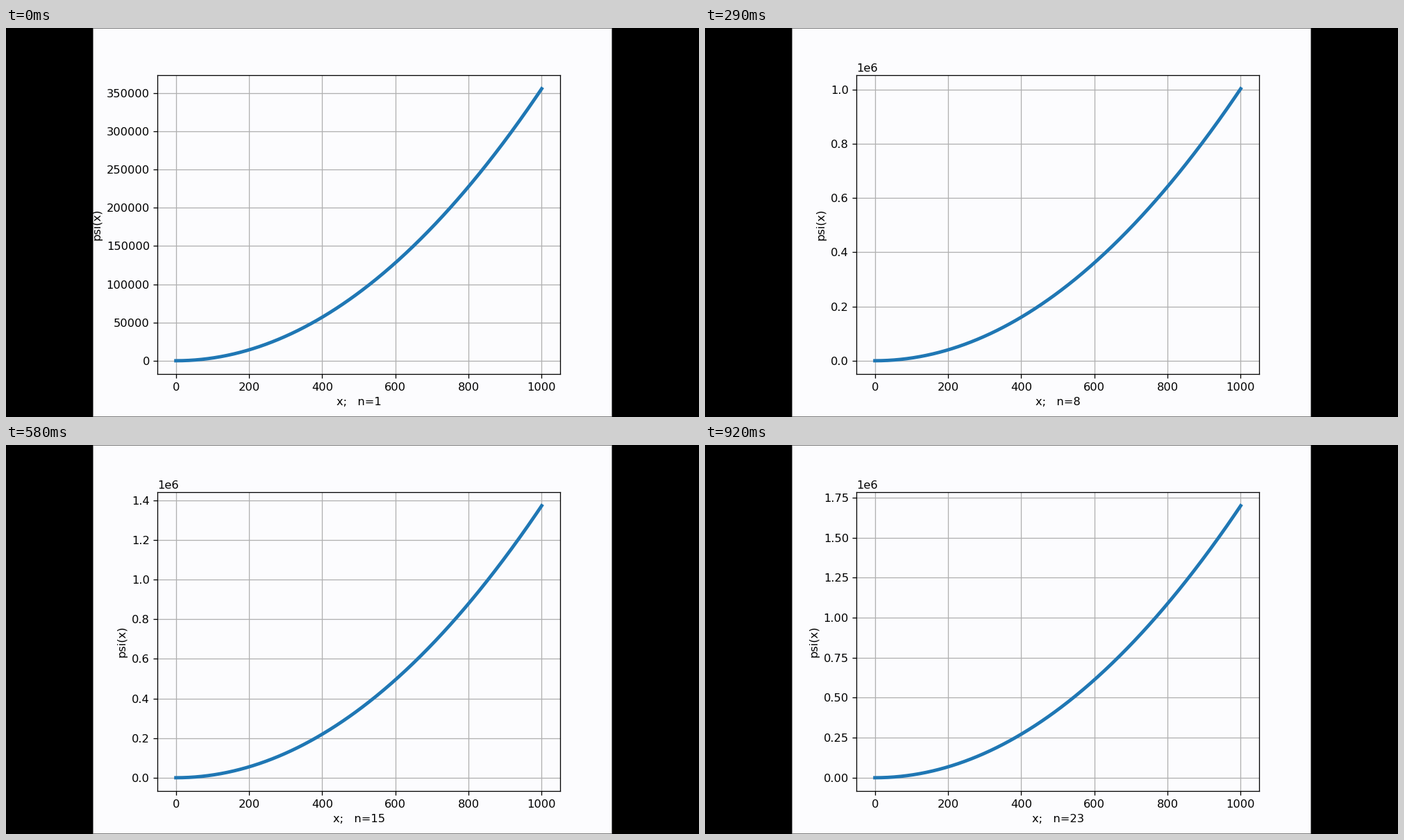
Animation, 998 px wide and 561 px high, one loop 970 ms. Source, as a matplotlib script:

```python
import math

import matplotlib.pyplot as plt
import numpy as np
from matplotlib.animation import FuncAnimation
from matplotlib.patches import Rectangle

W, H = 998, 561
DPI = 116.875
LEFT, RIGHT = 125, 873        # paper edges in pixels
EDGE = 0.5                    # soft outline of the paper
AX_LEFT, AX_RIGHT = 218.3, 797.8
AX_TOP, AX_BOTTOM = 67.95, 499.46
TICK_MS, LOOP_MS = 10, 970
FPS, N_MAX = 24, 23
PAPER = "#fcfcfe"

plt.rcParams["font.family"] = "DejaVu Sans"

# The small excess keeps the pixel size from truncating downwards.
fig = plt.figure(figsize=((W + 1e-4) / DPI, (H + 1e-4) / DPI),
                 dpi=DPI, facecolor=PAPER)


def pixel_box(left, top, right, bottom):
    """Figure fractions of a box given in pixels from the top left."""
    return left / W, 1 - bottom / H, (right - left) / W, (bottom - top) / H


def black_bar(left, top, right, bottom):
    x0, y0, width, height = pixel_box(left, top, right, bottom)
    fig.add_artist(Rectangle((x0, y0), width, height, fc="black", lw=0,
                             zorder=10, snap=False))


ax = fig.add_axes(pixel_box(AX_LEFT, AX_TOP, AX_RIGHT, AX_BOTTOM),
                  facecolor=PAPER)
x = np.linspace(0, 1000, 400)
curve, = ax.plot(x, x * 0, color="#1f77b4", lw=3)
ax.set_xlim(-50, 1050)
ax.set_ylabel("psi(x)")
ax.grid(True)

black_bar(0, 0, LEFT + EDGE, H)
black_bar(RIGHT - EDGE, 0, W, H)
black_bar(LEFT + EDGE, 0, RIGHT - EDGE, EDGE)
black_bar(LEFT + EDGE, H - EDGE, RIGHT - EDGE, H)

# Steps run at 24 per second, rounded to the 10 ms clock.
starts = [math.ceil(k * 1000 / FPS / TICK_MS - 0.5) for k in range(N_MAX)]


def psi(x, n):
    return math.sqrt(n) * (0.3544 + 0.0012 / n) * x ** 2


def draw(i):
    n = sum(start <= i for start in starts)
    y = psi(x, n)
    curve.set_ydata(y)
    ax.set_ylim(-0.05 * y[-1], 1.05 * y[-1])
    ax.set_xlabel(f"x;   n={n}")
    return curve,


anim = FuncAnimation(fig, draw, frames=LOOP_MS // TICK_MS,
                     interval=TICK_MS, repeat=True, repeat_delay=0)
plt.show()
```
